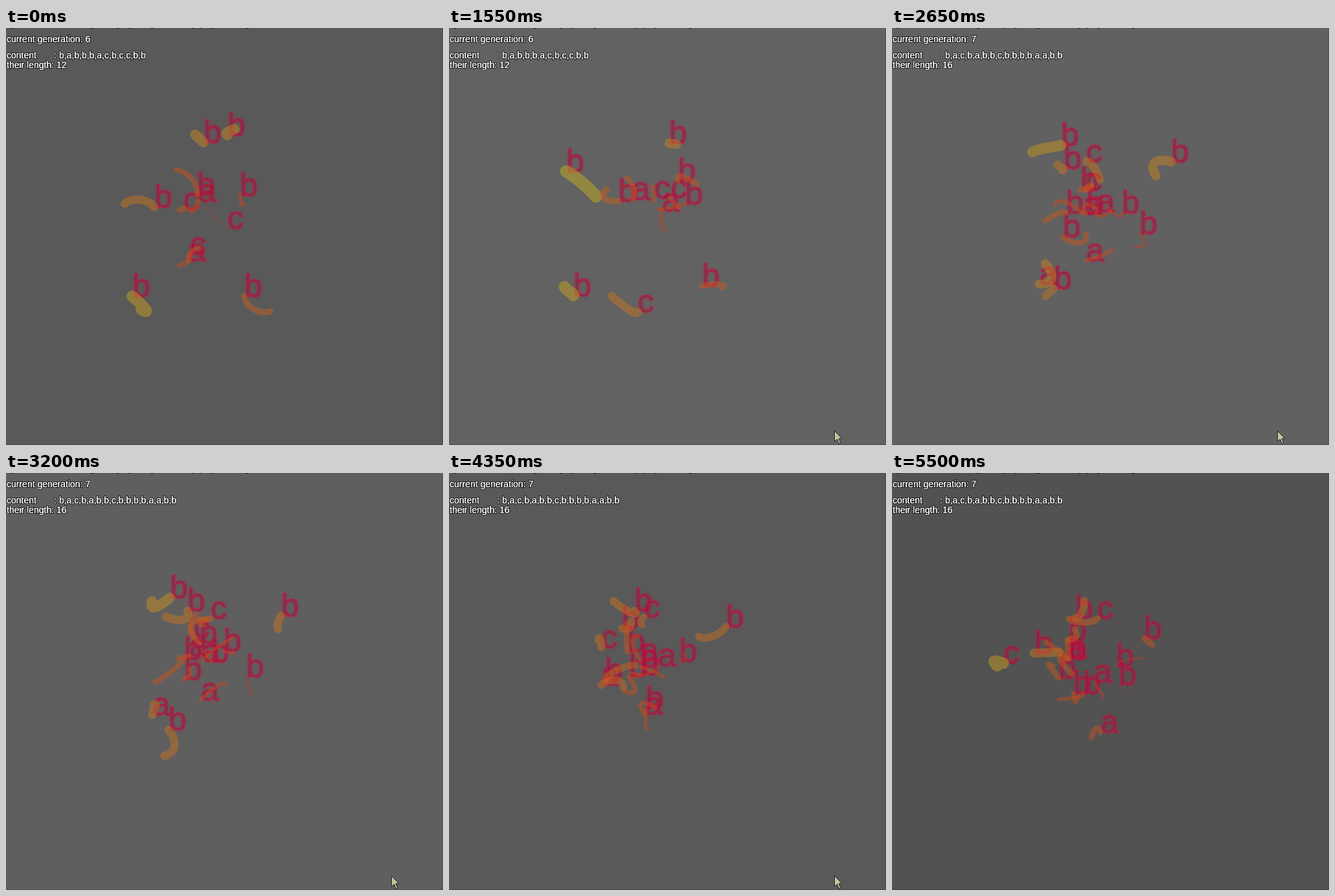
Recreate the animation shown at these times as an HTML page with a canvas. Size 675 by 645 pixels, loop 5550 ms.

```html
<!DOCTYPE html>
<html lang="en">
<head>
<meta charset="utf-8">
<title>Letter generations</title>
<style>
html, body { margin: 0; width: 100%; height: 100%; overflow: hidden; background: #5a5a5a; }
canvas { display: block; }
</style>
</head>
<body>
<canvas id="stage" width="675" height="645"></canvas>
<script>
const ctx = document.getElementById('stage').getContext('2d');
const LOOP = 5550, STEP = 50, TRAIL = 150, SPAWN = 1950, BURST = 100;
const CENTER = { x: 346, y: 322 };
const FONT = '"Liberation Sans", Arial, sans-serif';

// Each letter drifts from one place to another between the two key times.
const generations = [
  makeGeneration(6, 0, 950, `
    b 305,177 328,180 / a 297,268 277,252 / b 342,166 204,239 / b 229,277 257,255
    b 195,415 202,415 / a 281,360 327,294 / c 274,281 268,421 / b 368,415 399,415
    c 342,310 336,258 / c 284,350 325,253 / b 361,259 374,255 / b 295,258 351,255`),
  makeGeneration(7, 3200, 5500, `
    b 253,193 283,224 / a 226,374 268,287 / c 316,225 317,225 / b 280,213 273,258
    a 301,351 322,401 / b 425,221 389,256 / b 336,275 346,299 / c 290,254 172,294
    b 275,288 280,341 / b 275,319 257,317 / b 317,292 295,341 / b 251,397 350,327
    a 303,291 273,285 / a 283,283 312,323 / b 371,315 220,279 / b 299,263 273,288`)
];

function makeGeneration(number, from, to, text) {
  const letters = text.trim().split(/\s*[\/\n]\s*/).map((entry, i) => {
    const [char, ...places] = entry.split(' ');
    const [start, end] = places.map(place => {
      const [x, y] = place.split(',').map(Number);
      return { x, y };
    });
    return { char, start, end, from, to, seed: i * 2.4 + number };
  });
  return { number, letters, content: letters.map(l => l.char).join() };
}

const clamp = v => Math.max(0, Math.min(1, v));
const mix = (a, b, u) => ({ x: a.x + (b.x - a.x) * u, y: a.y + (b.y - a.y) * u });

function wobble(t, seed) {
  return {
    x: 20 * Math.sin(t / 85 + seed) + 9 * Math.sin(t / 53 + seed * 3),
    y: 20 * Math.cos(t / 97 + seed * 1.7) + 9 * Math.sin(t / 61 + seed)
  };
}

function positionAt(letter, t) {
  const { start, end, from, to, seed } = letter;
  const u = clamp((t - from) / (to - from));
  const place = mix(start, end, u);
  const now = wobble(t, seed);
  // Removing the wobble at both key times keeps the key places exact.
  const bias = mix(wobble(from, seed), wobble(to, seed), u);
  const point = { x: place.x + now.x - bias.x, y: place.y + now.y - bias.y };
  return from > SPAWN ? mix(CENTER, point, clamp((t - SPAWN) / BURST)) : point;
}

function drawTrail(letter, t) {
  const head = positionAt(letter, t);
  const distance = Math.hypot(head.x - CENTER.x, head.y - CENTER.y);
  const hue = 8 + distance * 0.08 + distance ** 2 / 1300;
  ctx.beginPath();
  for (let back = TRAIL; back >= 0; back -= 12.5) {
    const p = positionAt(letter, t - back);
    ctx.lineTo(p.x, p.y);
  }
  ctx.lineWidth = Math.max(1, distance / 10);
  ctx.strokeStyle = `hsla(${hue}, 75%, 45%, 0.48)`;
  ctx.stroke();
}

function drawLetter(letter, t) {
  const { x, y } = positionAt(letter, t);
  ctx.save();
  ctx.font = '50px ' + FONT;
  ctx.fillStyle = 'rgba(130, 20, 75, 0.5)';
  ctx.fillText(letter.char, x, y + 1);
  ctx.shadowColor = 'rgba(200, 20, 60, 0.4)';
  ctx.shadowBlur = 4;
  ctx.lineWidth = 1.6;
  ctx.strokeStyle = 'rgba(205, 18, 58, 0.7)';
  ctx.strokeText(letter.char, x, y + 1);
  ctx.restore();
}

function label(text, y, fill = '#fff') {
  ctx.font = '14px ' + FONT;
  ctx.lineWidth = 2;
  ctx.strokeStyle = '#111';
  ctx.strokeText(text, 1, y);
  ctx.fillStyle = fill;
  // Two passes give the solid, bright edges of repeated drawing.
  ctx.fillText(text, 1, y);
  ctx.fillText(text, 1, y);
}

function drawCursor() {
  ctx.save();
  ctx.translate(595.5, 623.5);
  const arrow = new Path2D('M0 0V16L4 12.5 7 19.5 9.5 18.5 6.5 11.5H11Z');
  ctx.fillStyle = '#c4c6a0';
  ctx.fill(arrow);
  ctx.lineWidth = 1;
  ctx.strokeStyle = '#222';
  ctx.stroke(arrow);
  ctx.restore();
}

function shadeAt(t) {
  const peak = 2100;
  const shade = t < peak
    ? 89 + 10 * Math.sin(Math.PI / 2 * t / peak)
    : 99 - 17 * ((t - peak) / (5500 - peak)) ** 1.2;
  return Math.round(shade);
}

function draw(t) {
  const shade = shadeAt(t);
  ctx.fillStyle = `rgb(${shade}, ${shade}, ${shade})`;
  ctx.fillRect(0, 0, 675, 645);
  ctx.fillStyle = 'rgba(0, 0, 0, 0.2)';
  ctx.fillRect(674, 0, 1, 645);
  ctx.fillRect(0, 644, 674, 1);

  ctx.lineCap = ctx.lineJoin = 'round';
  const { number, letters, content } = generations[t < SPAWN ? 0 : 1];
  letters.forEach(letter => drawLetter(letter, t));
  letters.forEach(letter => drawTrail(letter, t));

  label('system rules: letters grow by splitting, then they play, moving on', -3, '#111');
  label('current generation: ' + number, 22);
  label('content' + '\u00a0'.repeat(7) + ': ' + content, 47);
  label('their length: ' + letters.length, 62);
  if (t >= 300 && t < 5150) drawCursor();
}

const start = performance.now();
function frame() {
  const elapsed = (performance.now() - start) % LOOP;
  draw(Math.floor(elapsed / STEP) * STEP);
  requestAnimationFrame(frame);
}
frame();
</script>
</body>
</html>
```
